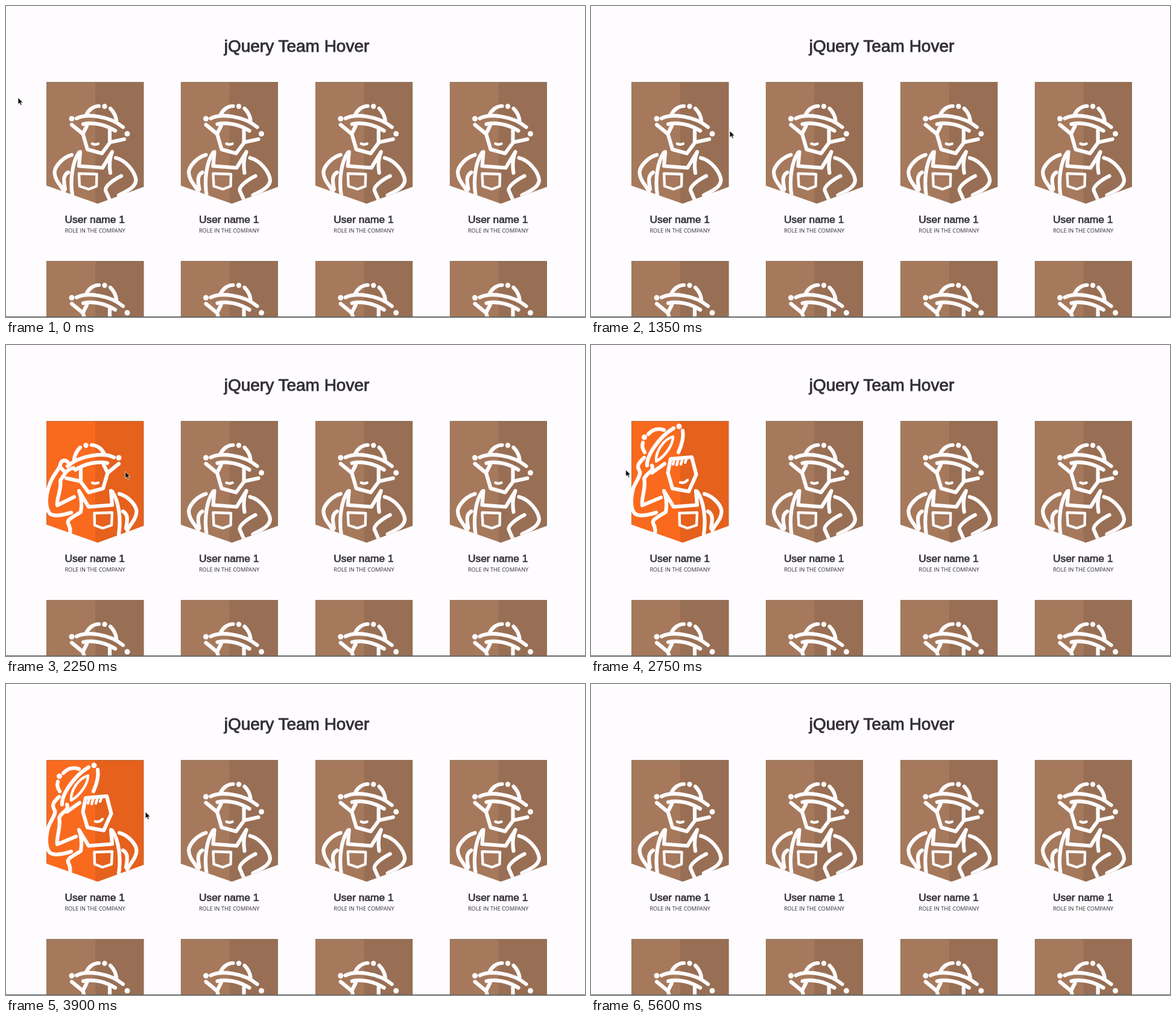
Recreate the animation shown at these times as an HTML page. Size 960 px wide and 516 px high, loop 5650 ms.

```html
<!DOCTYPE html>
<html lang="en">
<head>
<meta charset="utf-8">
<title>Team Hover</title>
<style>
  html, body { margin: 0; width: 100%; height: 100%; overflow: hidden; background: #fefcff; }
  svg { display: block; width: 960px; height: 516px; }
  .ink { fill: none; stroke: #fdfbfd; stroke-width: 6.2; stroke-linecap: round; stroke-linejoin: round; }
  .thin { stroke-width: 4.4; }
  .dot { fill: #fdfbfd; stroke: none; }
  .calm { color: #a6795c; }
  .hot { color: #f96a1e; }
  text { text-anchor: middle; fill: #333036; }
  .title, .name { font-family: "Liberation Sans", Arial, sans-serif; stroke: #333036; }
  .title { font-size: 28px; stroke-width: .9px; }
  .name { font-size: 17.4px; stroke-width: .65px; }
  .role { font: 9.2px "Open Sans", sans-serif; }

  /* Poses are stacked 300px apart and shown through the badge outline. */
  .strip { animation: poses 5650ms step-end infinite; }
  @keyframes poses {
    0%, 23.01%, 52.57%, 73.63%, 100% { transform: translateY(0); }
    11.68%, 21.24%, 37.35%, 50.8%, 59.47%, 71.86% { transform: translateY(-300px); }
    13.63%, 19.47%, 39.12%, 49.03%, 61.24%, 70.09% { transform: translateY(-600px); }
    15.58%, 40.88%, 63.01% { transform: translateY(-900px); }
  }

  .cursor { animation: roam 5650ms linear infinite; }
  @keyframes roam {
    0%, .4% { transform: translate(20px, 152px); }
    10.62% { transform: translate(67px, 176px); }
    13.27% { transform: translate(97px, 188px); }
    18.4% { transform: translate(226px, 206px); }
    19.5% { transform: translate(232px, 207px); }
    23.89% { transform: translate(230px, 207px); }
    30.1% { transform: translate(246px, 209px); }
    36.3% { transform: translate(229px, 210px); }
    39.82% { transform: translate(198px, 210px); }
    47.8% { transform: translate(66px, 207px); }
    53.1%, 55.8% { transform: translate(16px, 207px); }
    58.41% { transform: translate(69px, 205px); }
    68.14% { transform: translate(226px, 212px); }
    69.03% { transform: translate(231px, 212px); }
    74.3%, 79.6% { transform: translate(256px, 222px); }
    88.5%, 100% { transform: translate(300px, 530px); }
  }
</style>
</head>
<body>
<svg viewBox="0 0 960 516">
  <defs>
    <clipPath id="badge"><path d="M67 126H228.500V300L152 328L67 298Z"/></clipPath>

    <g id="panel">
      <path fill="currentColor" d="M67 126H229V329H67Z"/>
      <path fill="#000" opacity=".083" d="M148 126H229V329H148Z"/>
      <path fill="none" stroke="#7d7458" opacity=".5" d="M67.500 298V126.500H228V300"/>
    </g>

    <g id="head" class="ink">
      <path d="M133 181C137 172 145 166 154 166M173 170C179 176 182 182 183 190"/>
      <path d="M117 186.500C133 178 172 182 194 201"/>
      <path d="M109 197L126 211M128 196C145 192 165 197 181 207"/>
      <path d="M134 199L127.500 212L135 238L159 244.500L172 227V206M173 226L196 221"/>
      <path class="thin" d="M143 228.500Q148 231 153 228.500"/>
      <circle class="dot" cx="163.500" cy="166.500" r="4.200"/>
      <circle class="dot" cx="109" cy="187" r="4.500"/>
    </g>

    <g id="bib" class="ink">
      <path d="M121 243C110 259 106 288 110 314"/>
      <path d="M123 242L121 265.500L160 268.500L176 242C172 252 171 265 173 277"/>
      <path class="thin" d="M121 278L150.500 279L150 299L137 304L122 299Z"/>
    </g>

    <g id="bentArm" class="ink">
      <path d="M109 247C94 251 81 266 80.500 276C81 290 92 298 96 308"/>
      <path d="M103 276C95 281 95 288 98 304"/>
    </g>

    <g id="hipArm" class="ink">
      <path d="M182 252C199 256 214 275 215.500 289C215 301 200 307 187 314"/>
      <path d="M191 282C177 289 164 299 165 306L172 322"/>
      <circle class="dot" cx="201" cy="212" r="4.500"/>
    </g>

    <g id="rest">
      <use href="#head"/><use href="#bib"/><use href="#bentArm"/><use href="#hipArm"/>
    </g>

    <g id="reach">
      <g transform="translate(-3.500)">
        <use href="#head"/><use href="#bib"/><use href="#hipArm"/>
      </g>
      <g class="ink">
        <path d="M99 190C88 185 78 199 82 207C87 215 76 222 71 238C66 255 66 270 73 280C80 285 92 284 101 283"/>
        <path d="M102 201C93 203 97 208 91 211C86 216 93 225 91 238C88 250 82 262 85 268L103 253"/>
      </g>
    </g>

    <g id="turned">
      <g transform="matrix(-1 0 0 1 297 0)"><use href="#bib"/><use href="#bentArm"/></g>
      <path class="ink" d="M121 279C108 287 101 290 103 296C108 305 107 312 104 320"/>
    </g>

    <g id="grab">
      <use href="#turned"/>
      <use href="#head" transform="matrix(-1 0 0 1 296 0)"/>
      <g class="ink">
        <path d="M104 196C98 189 91 191 90 199C88 207 78 215 72 232C64 255 66 272 73 280C80 285 92 283 108 278"/>
        <path d="M112 204C100 206 97 215 90 225C93 238 83 256 85 266L113 252M90 203L98 211"/>
      </g>
    </g>

    <g id="doff">
      <use href="#turned"/>
      <g class="ink">
        <path d="M93 200C92 184 112 153 137 138M95 148C103 139 111 138 121 141"/>
        <path d="M86 162C84 169 86 173 89 178M152 142C154 154 150 167 145 178M101 212L122 197"/>
        <path class="thin" d="M108 193C107 176 120 157 136 152C136 165 124 184 108 193Z"/>
        <path d="M132 189L127.500 212L135 238L162 243L174.500 215L167 186Z"/>
        <path class="thin" d="M138 190L136 198M145 189L142 199M152 188L149 198M159 187L156 195M148 228Q155 230 160 224"/>
        <path d="M88 187C80 195 75 200 80 208C85 215 74 226 70 238C65 257 66 273 73 280C80 285 92 283 108 278"/>
        <path d="M101 200C106 209 92 212 88 222C92 235 83 254 85 266L116 253"/>
        <circle class="dot" cx="88.500" cy="153" r="4.500"/>
        <circle class="dot" cx="146" cy="135" r="4.500"/>
      </g>
    </g>

    <g id="label">
      <text class="name" x="147.200" y="360">User name 1</text>
      <text class="role" x="147.600" y="376">ROLE IN THE COMPANY</text>
    </g>

    <g id="card">
      <g clip-path="url(#badge)" class="calm"><use href="#panel"/><use href="#rest"/></g>
      <use href="#label"/>
    </g>
  </defs>

  <rect width="960" height="516" fill="#fefcff"/>
  <text class="title" x="482" y="76">jQuery Team Hover</text>

  <g clip-path="url(#badge)">
    <g class="strip">
      <g class="calm"><use href="#panel"/><use href="#rest"/></g>
      <g class="hot" transform="translate(0 300)"><use href="#panel"/><use href="#reach"/></g>
      <g class="hot" transform="translate(0 600)"><use href="#panel"/><use href="#grab"/></g>
      <g class="hot" transform="translate(0 900)"><use href="#panel"/><use href="#doff"/></g>
    </g>
  </g>
  <use href="#label"/>

  <use href="#card" x="222.500"/>
  <use href="#card" x="445.800"/>
  <use href="#card" x="668.500"/>
  <use href="#card" y="297"/>
  <use href="#card" x="222.500" y="297"/>
  <use href="#card" x="445.800" y="297"/>
  <use href="#card" x="668.500" y="297"/>
  <rect y="515" width="960" height="1" fill="#59605c"/>

  <path class="cursor" d="M0 0V11.200L2.600 8.800L4.400 12.800L6.300 12L4.600 8.200H8Z"
        fill="#000" stroke="#fff" stroke-width=".8"/>
</svg>
</body>
</html>
```
